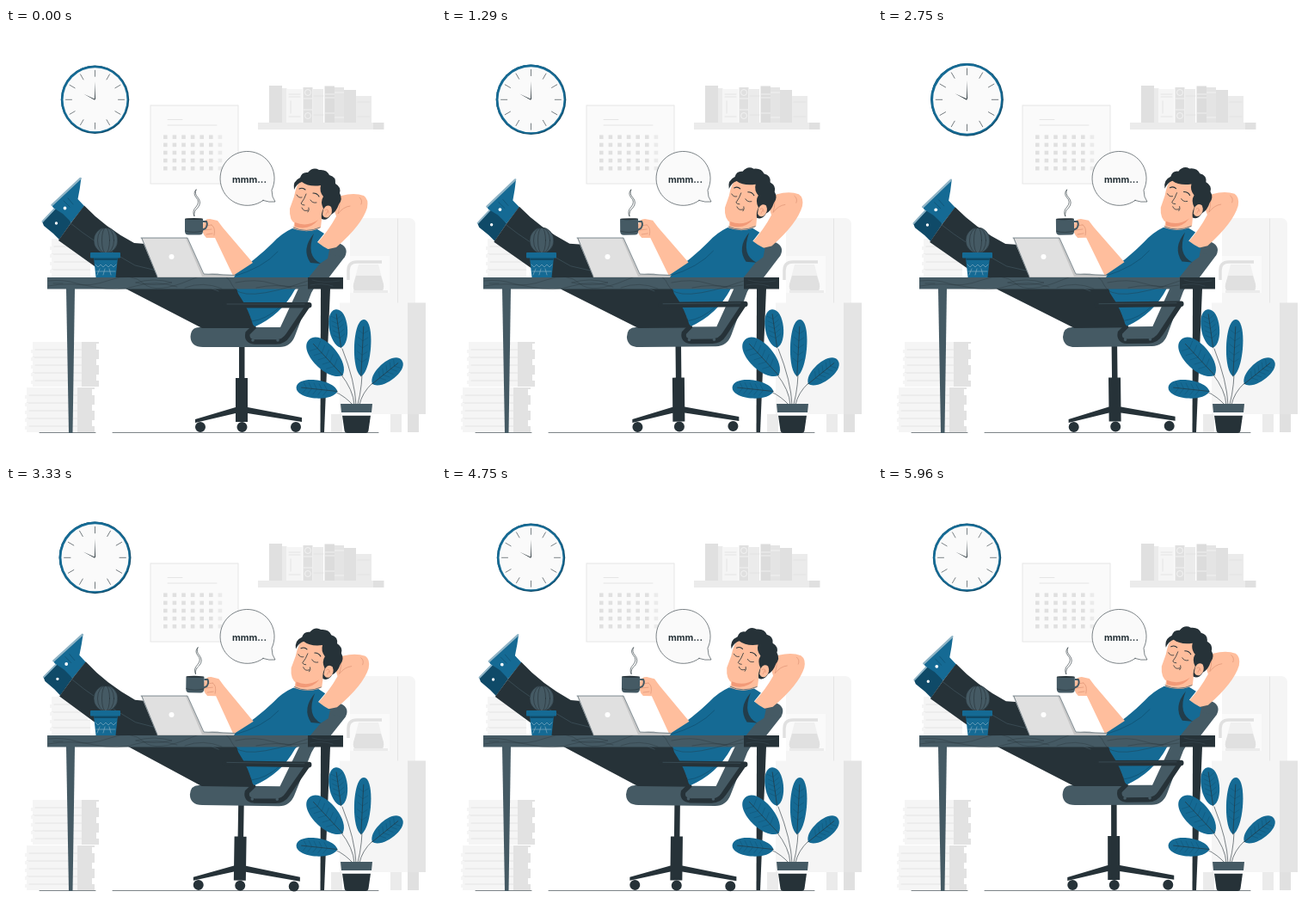
Write an HTML page that moves like this. It is 500x500 px and loops after 6 s.

```html
<!DOCTYPE html>
<html lang="en">
<head>
<meta charset="utf-8">
<title>Coffee break</title>
<style>
html, body { margin: 0; width: 100%; height: 100%; overflow: hidden; background: #fff; }
svg { display: block; width: 100vw; height: 100vh; }
text { font: 700 10.7px Inter, Roboto, sans-serif; }
.blue { fill: #156a94; }
.deep { fill: #0f4a68; }
.dark { fill: #263238; }
.slate { fill: #455a64; }
.skin { fill: #ffbe9d; }
.line { fill: none; stroke: #263238; stroke-width: .6; stroke-linecap: round; stroke-linejoin: round; }
.bold { stroke-width: 1.1; }
.pale { stroke: #e0e0e0; stroke-width: .8; }
.warm { stroke: #d98e70; }
.navy { stroke: #0f4a68; }
.steel { stroke: #455a64; }
.sky { stroke: #8fb4c6; }
.grain { stroke-width: .5; opacity: .7; }
</style>
</head>
<body>
<svg viewBox="0 0 500 500">
  <!-- calendar -->
  <rect x="168" y="90" width="102" height="91" fill="#fafafa" stroke="#e6e6e6"/>
  <path class="line pale" d="M188 106.500H205M188 113H245"/>
  <g id="days"></g>

  <!-- shelf -->
  <g id="books"></g>
  <path fill="#ebebeb" d="M293 110H427V118H293z"/>
  <path fill="#e0e0e0" d="M427 110H439.500V118H427z"/>
  <g fill="none" stroke="#f5f5f5" stroke-width=".8">
    <circle cx="351" cy="75" r="3.500"/><circle cx="351" cy="102" r="3.500"/>
    <path d="M346 82H356M346 95H356M371 77H382M371 81H382M371 99H382M382 75H393M382 104H393"/>
  </g>
  <path class="line pale" d="M329 77H342M329 80H342M329 103H342M331 85V99M358 79H369M358 101H369M409 86H423M409 103H423"/>

  <!-- coffee corner -->
  <path fill="#f5f5f5" d="M400 320V229Q400 221 408 221H468Q476 221 476 229V320z"/>
  <path class="line pale" d="M455.500 222V320"/>
  <path fill="#fafafa" d="M400 265H446V308H400z"/>
  <path fill="#f0f0f0" d="M410 275H433L439 298Q440 305 436 306H407Q403 305 404 298z"/>
  <path fill="#e0e0e0" d="M407 288H436L439 298Q440 305 436 306H407Q403 305 404 298z"/>
  <path d="M437 272H408Q398 272 398 282V293" fill="none" stroke="#e0e0e0" stroke-width="3.500"/>
  <path fill="#ebebeb" d="M404 305H444V308H404z"/>
  <path fill="#f5f5f5" d="M388 319.500H467V449H388z"/>
  <path fill="#e4e4e4" d="M467 319.500H488V449H467z"/>
  <path fill="#ebebeb" d="M378 449H391V470H378zM447 449H460V470H447z"/>
  <path fill="#e0e0e0" d="M467 449H480V470H467z"/>

  <!-- paper piles -->
  <g id="piles"></g>
  <path class="line" d="M39 470.500H104M124 470.500H433"/>

  <!-- clock -->
  <g id="clock">
    <circle r="39.700" class="deep"/>
    <circle r="39.200" cx="-.4" cy="-.4" class="blue"/>
    <circle r="37" fill="#fafafa"/>
    <path id="ticks" class="line"/>
    <path class="dark" d="M.4 -.4L-13 -6.500L-.4 .5zM-.5 0L0 -21L.5 0z"/>
  </g>

  <g id="man">
    <!-- chair base -->
    <path class="dark" d="M271 370H277.500V407H281V441L344 453V458L281 448V458H267V448L220 459V455L267 441V407H271z"/>
    <g class="dark"><circle cx="226" cy="464" r="6"/><circle cx="274.500" cy="464" r="6"/><circle cx="337" cy="464" r="6"/></g>

    <!-- chair seat and back -->
    <path class="slate" d="M225 348H319L340 303L368 262Q380 247 389 251Q399 256 394 266Q364 290 355 308L336 358Q331 371 318 371H229Q215 371 214.500 359Q215 348 225 348z"/>
    <path class="slate" d="M368 262L394 266L374 292H350z"/>

    <!-- shoes -->
    <path class="deep" d="M42 225L60 206L69 216L76 226L62 246L55 239L44 230z"/>
    <path class="line sky" d="M42.500 225L60 206.500" style="stroke-width:2"/>
    <path class="blue" d="M53 206L87.500 174Q86 187 83.500 199L91 207L76 226L66 216L55 209z"/>
    <path class="line sky" d="M53.500 206L86.500 175" style="stroke-width:2.400"/>
    <path class="line navy" d="M67 201L74 208M72 198L78 205"/>
    <g fill="#fff"><circle cx="68.500" cy="209.500" r="1.900"/><circle cx="58.500" cy="227" r="1.700"/></g>

    <!-- trousers -->
    <path class="dark" d="M91 206.500Q115 232 149 250L175 252L228 289L274 295L291 349H228L140 303.500L61 247L76 226z"/>
    <path class="line steel" d="M75 227Q100 248 150 276Q205 288 247 306M270 304Q283 320 285 338"/>

    <!-- raised arm -->
    <path class="skin" d="M360 252Q375 236 384 219L379 203L390 195Q405 191 416 195Q422 199 420 209Q414 229 384 255L366 259z"/>
    <path class="line warm" d="M388 203Q388 210 386 216Q392 208 400 207M411 197Q415 200 413 205"/>

    <!-- neck and shirt -->
    <path class="skin" d="M336 220L334 235Q350 242 366 232L368 213z"/>
    <path class="blue" d="M333 233Q348 239 362 234L370 239L362 249Q368 254 376 258L374 268L365 274L352 290L336 304Q320 334 288 348Q283 328 270 309L263 288Q292 268 310 250Q320 239 333 233z"/>
    <path class="dark" d="M358 239Q343 257 354 273L366 274Q348 265 358 239z" opacity=".8"/>
    <path class="line navy" d="M264 289Q299 279 316 260M286 341Q302 339 318 325M334 232Q349 239 365 232"/>

    <!-- head -->
    <path class="skin" d="M343 176Q337 184 335 196L330 210Q329 224 337 228Q356 232 366 221L374 205L368 178z"/>
    <path class="dark" d="M335 188Q333 178 342 174Q344 167 351 168Q357 161 364 165Q373 164 376 171Q384 173 383 181Q390 185 388 192Q392 199 387 205Q384 214 378 217Q373 225 367 222Q366 216 369 210Q365 202 369 196Q364 190 366 183Q352 185 344 179Q338 181 335 188z"/>
    <path class="skin" d="M369 211Q373 204 378 208Q381 215 375 220Q370 222 368 217z"/>
    <path class="line bold" d="M341 187Q345 185 348 188M357 192Q362 192 364 196"/>
    <path class="line" d="M338 194Q340 198 344 197M354 200Q356 204 361 203M349 193Q347 199 343 204Q344 206 347 206M344 209Q346 214 351 212M352 209Q353 212 351 214" style="stroke-width:.8"/>
    <path d="M336 226Q350 232 363 223Q353 236 336 231z" fill="#f29a78"/>
    <path class="line warm" d="M371 212Q375 209 375 215M372 217L374 213"/>

    <!-- arm with cup -->
    <path class="skin" d="M229 228Q230 222 237 222L246 224L252 232L287 273L264 288L243 244L233 244Q227 239 229 228z"/>
    <path class="line warm" d="M232 230L239 229M231 235L239 234M233 240L240 239M239 229Q244 232 242 241"/>
    <path d="M229 225H233Q235 229 232 233L228 235" fill="none" stroke="#455a64" stroke-width="2"/>
    <path class="slate" d="M208 222H229V236Q229 240.500 225 240.500H212Q208 240.500 208 236z"/>
    <ellipse class="dark" cx="218.500" cy="222" rx="10.500" ry="1"/>
    <path class="line" d="M208.500 236Q218 239 228.500 236"/>
    <path class="line" d="M221 188Q217 192 221 197Q226 202 221 208Q216 213 219 219Q218 213 223 209Q228 203 223 197Q219 193 221 188z"/>

    <!-- armrest -->
    <path d="M351 323L328 357Q323 365 314 365H289Q279 364 281 355L289 347" fill="none" stroke="#263238" stroke-width="5.500"/>
    <rect class="dark" x="251.500" y="319" width="104" height="6.500" rx="3.200"/>
    <path class="line steel" d="M257 321H347"/>
    <g class="slate"><circle cx="287" cy="363" r="1.800"/><circle cx="316" cy="363" r="1.800"/></g>
  </g>

  <!-- desk -->
  <path class="slate" d="M70 303H80L77.500 471H73z"/>
  <path class="dark" d="M366 303H377L370 470H365.500z"/>
  <path class="slate" d="M48 290H351V303.500H48z"/>
  <path class="dark" d="M351 290H392V303.500H351z"/>
  <path class="line grain" d="M49 294Q68 292 82 297T121 293T160 297T214 293T263 299T351 294M49 300Q75 295 103 301T151 300Q174 293 199 301M151 296Q172 290 193 296Q172 301 151 296M208 302Q229 294 251 303M267 296Q291 291 309 297T350 299M291 302Q315 297 332 302M55 297H66"/>
  <path class="line steel grain" d="M356 293Q369 297 388 294M354 299Q367 296 380 300"/>

  <!-- laptop -->
  <path fill="#c7c7c7" d="M157 244H211L230 286L267 287L265 290H176z"/>
  <path fill="#e0e0e0" d="M158 244.500H209L228 289H176z"/>
  <path class="line steel" d="M157 244H211L230 286L267 287.500M158 244.500L176 289"/>
  <circle cx="192.500" cy="266" r="3" fill="#fff"/>

  <!-- cactus -->
  <ellipse class="slate" cx="116" cy="247" rx="14" ry="15"/>
  <g class="line"><ellipse cx="116" cy="247" rx="14" ry="15"/><ellipse cx="116" cy="247" rx="9.500" ry="15"/><ellipse cx="116" cy="247" rx="4.500" ry="15"/></g>
  <path class="blue" d="M102 267H130L127.500 290H104.500z"/>
  <path class="deep" d="M102 267H130L129.500 270H102.500z"/>
  <rect class="blue" x="98" y="261" width="35" height="6.500" rx="1"/>
  <path class="line sky" d="M104 275L107 278L110 275L113 278L116 275L119 278L122 275L125 278L128 275M105 283H127M106 287L109 280M113 287L115 280M122 287L120 280"/>

  <!-- plant -->
  <path class="line" d="M407 438Q406 411 391 373M405 438Q404 421 389 402M409 438Q415 414 414 391M403 438Q395 429 383 423M411 438Q414 424 426 413"/>
  <g id="leaves"></g>
  <path class="dark" d="M391 450.500H424L421.500 468Q421 471 418 471H397Q394 471 393.500 468z"/>
  <path fill="#fff" d="M390 446H425L424.500 450.500H390.500z"/>
  <path class="slate" d="M389 437H426L425 447H390z"/>

  <!-- speech -->
  <path class="line" d="M299 200.500A31.500 31.500 0 1 1 309 188.500Q309 197 313 202Q306 203 299 200.500z" style="fill:#fafafa"/>
  <text x="283" y="179.500" text-anchor="middle" class="dark">mmm...</text>
</svg>
<script>
const $ = id => document.getElementById(id);
const rect = (x, y, w, h, fill) =>
  `<rect x="${x}" y="${y}" width="${w}" height="${h}" fill="${fill}"/>`;

for (let i = 0; i < 35; i++)
  $('days').innerHTML += rect(183 + i % 7 * 10.6, 124.5 + (i / 7 | 0) * 9.1, 4.6, 4.6, i % 7 > 5 ? '#ebebeb' : '#e0e0e0');

// x, top, width, colour
$('books').innerHTML = [
  [306, 67, 15, '#e0e0e0'], [321, 70, 5.5, '#ebebeb'], [327, 71, 17.5, '#f5f5f5'],
  [345.5, 69, 11, '#e0e0e0'], [357, 71, 12, '#ebebeb'], [370.5, 67.5, 11.5, '#dcdcdc'],
  [382, 69, 11, '#e4e4e4'], [393, 72, 14, '#e0e0e0'], [407, 79, 18, '#ebebeb']
].map(([x, y, w, c]) => rect(x, y, w, 110 - y, c)).join('');

function pile(x, y, w, h, side) {
  let s = rect(x, y, w, h, '#f5f5f5') + rect(x + w - side, y, side, h, '#e2e2e2');
  for (let k = 1; k * 9 < h; k++) {
    const ly = y + k * 9, dx = k % 2 * 3;
    s += `<path class="line pale" d="M${x + dx} ${ly}H${x + w - side}"/>` +
      rect(x + w - dx, ly - 7, dx + 1, 7, '#fff') + rect(x - 2, ly, 4, 4, '#f5f5f5');
  }
  return s;
}
$('piles').innerHTML = pile(53, 245, 45, 45, 0) + pile(31, 365, 77, 52, 20) + pile(24, 418, 79, 52, 20);

$('ticks').setAttribute('d', Array.from({ length: 12 }, (_, i) => {
  const c = Math.cos(i * Math.PI / 6), s = Math.sin(i * Math.PI / 6);
  return `M${27 * c} ${27 * s}L${34 * c} ${34 * s}`;
}).join(''));

// Upright leaf of half-length h and half-width w, turned by a degrees
function leaf(x, y, h, w, a) {
  let veins = '';
  for (let k = -2; k < 3; k++) veins += `M${-w * .6} ${k * h / 4 - 4}L0 ${k * h / 4}L${w * .6} ${k * h / 4 - 4}`;
  return `<g transform="translate(${x} ${y}) rotate(${a})">
    <path class="blue" d="M0 ${h}C${-w * 1.3} ${h * .8} ${-w * 1.4} ${-h} 0 ${-h}C${w * 1.4} ${-h} ${w * 1.3} ${h * .8} 0 ${h}z"/>
    <path class="line navy grain" d="${veins}"/><path class="line" d="M0 ${h}V${-h * .75}"/></g>`;
}
$('leaves').innerHTML = leaf(386.5, 349.5, 22.5, 10.5, -8) + leaf(372, 383, 28.5, 14, -43) +
  leaf(414.5, 372, 33, 9.5, 3) + leaf(361.5, 420, 24, 10.5, -84) + leaf(443, 400, 22, 10.5, 51);

const BEAT = 1500;
// Triangle waves: sway goes 0, 1, 0, -1, 0; pulse goes 0, 1, 0
const sway = p => p < .25 ? p * 4 : p < .75 ? 2 - p * 4 : p * 4 - 4;
const pulse = p => p < 0 || p > 1 ? 0 : 1 - Math.abs(2 * p - 1);

function draw(now) {
  const t = now % 6000;
  const size = 1 + .1 * (pulse(t / BEAT) + pulse((t - 2250) / BEAT));
  $('man').setAttribute('transform', `rotate(${sway(t % BEAT / BEAT)} 231.5 317)`);
  $('clock').setAttribute('transform', `translate(103.5 83.3) scale(${size})`);
}
const start = performance.now();
function frame() {
  draw(performance.now() - start);
  requestAnimationFrame(frame);
}
frame();
</script>
</body>
</html>
```
